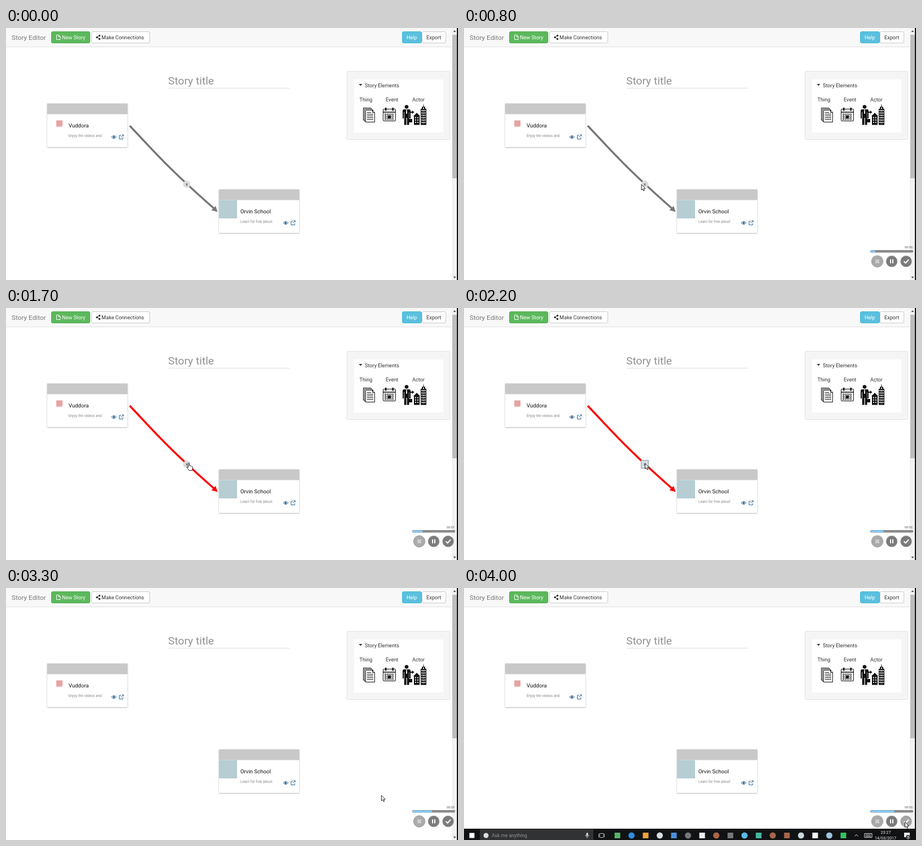
An HTML page that plays this animation: 800x446 px, repeating every 4100 ms.

```html
<!DOCTYPE html>
<html lang="en">
<head>
<meta charset="utf-8">
<title>Story Editor</title>
<style>
  html, body { margin: 0; width: 100%; height: 100%; overflow: hidden; background: #fff; }
  svg { display: block; width: 800px; height: 446px; font: 9.1px Roboto, sans-serif; fill: #333; }
  .line { fill: none; stroke: currentColor; }
  .mid { text-anchor: middle; }
</style>
</head>
<body>
<svg viewBox="0 0 800 446">
  <defs>
    <filter id="shadow" x="-10%" y="-10%" width="120%" height="130%">
      <feDropShadow dx="0" dy="1" stdDeviation="1" flood-opacity=".35"/>
    </filter>
    <g id="tools" color="#2f6a9c">
      <path class="line" d="M-4.3 0Q0-5 4.3 0Q0 5-4.3 0Z"/>
      <circle r="1.8" fill="#23598a"/>
      <path class="line" d="M13-3H9.5V3.5H16V.5M12.5 .5L17-4M14-4H17V-1"/>
    </g>
  </defs>

  <!-- Toolbar -->
  <path fill="#f8f8f8" d="M0 0H789V33H0Z"/>
  <path fill="#e2e2e2" d="M0 33H789V34H0Z"/>
  <text x="10" y="21" font-size="11.8" fill="#777">Story Editor</text>
  <rect x="80.5" y="6.5" width="68" height="20" rx="2.5" fill="#5cb85c" stroke="#4cae4c"/>
  <path class="line" color="#fff" d="M89.5 12.5H93.5L96 15V20.5H89.5ZM93 12.5V15.5H96"/>
  <text x="99" y="19.5" fill="#fff">New Story</text>
  <rect x="151.5" y="6.5" width="103" height="20" rx="2.5" fill="#fff" stroke="#ccc"/>
  <path class="line" color="#333" d="M165.5 13.5L161 16.5L165.5 19.5"/>
  <circle cx="161" cy="16.5" r="1.7"/>
  <circle cx="165.5" cy="13.5" r="1.7"/>
  <circle cx="165.5" cy="19.5" r="1.7"/>
  <text x="169" y="19.5">Make Connections</text>
  <rect x="701.5" y="6.5" width="34" height="20" rx="2.5" fill="#5bc0de" stroke="#46b8da"/>
  <text x="709" y="19.5" fill="#fff">Help</text>
  <rect x="736.5" y="6.5" width="42" height="20" rx="2.5" fill="#fff" stroke="#ccc"/>
  <text x="744" y="19.5">Export</text>

  <!-- Scrollbar -->
  <path fill="#f1f1f1" d="M789 0H798V446H789Z"/>
  <path fill="#bcbcbc" d="M790 12H798V266H790Z"/>
  <path fill="#555" d="M791.5 7L794 4L796.5 7ZM791.5 440L794 443L796.5 440Z"/>
  <path fill="#111" d="M798 0H800V446H798Z"/>

  <text x="287" y="99.5" font-size="19.2" fill="#929292">Story title</text>
  <path fill="#ddd" d="M287 106H502V107H287Z"/>

  <!-- Elements panel -->
  <rect x="603.5" y="76.5" width="182" height="121" rx="2" fill="#f5f5f5" stroke="#e3e3e3"/>
  <path fill="#fff" d="M616 91H774V185H616Z"/>
  <path d="M624.5 99H630.5L627.5 102.5Z"/>
  <text x="635" y="104.5">Story Elements</text>
  <text x="625.5" y="129.5">Thing</text>
  <text x="672" y="129.5">Event</text>
  <text x="719" y="129.5">Actor</text>
  <g color="#111" fill="#111">
    <!-- Page stack -->
    <path class="line" d="M634 163H632.5V141.5H645.5L648 144M636 165H634.5V143.5H647.5L650 146"/>
    <path class="line" d="M636.5 145.5H648.5L652.5 149.5V166.5H636.5ZM648.5 145.5V149.5H652.5"/>
    <path class="line" d="M639 149.5H646M639 152.5H650M639 155.5H650M639 158.5H650M639 161.5H650"/>
    <!-- Calendar -->
    <rect class="line" x="667.5" y="143.5" width="22" height="21" rx="1.5"/>
    <path class="line" d="M668 149H690" stroke-width="1.5"/>
    <path class="line" stroke-width="3" stroke-dasharray="3 1.2" d="M670 153H687M670 157H687M670 161H687"/>
    <path stroke="#fff" stroke-width="1.4" fill="none" stroke-dasharray="1.6 2.6" d="M670.7 153H687M670.7 157H687M670.7 161H687"/>
    <path d="M671 141H673.5V146.5H671ZM683.5 141H686V146.5H683.5ZM676 155H681V160H676Z"/>
    <!-- Person -->
    <circle cx="709" cy="139.5" r="3.3"/>
    <path d="M704.5 144H713.5Q716 144 716 147V160H714V149H713.5V171.5H709.7V159H708.5V171.5H704.8V149H704V160H702V147Q702 144 704.5 144ZM712 161H719V167H712Z"/>
    <path fill="#fff" d="M708.3 144.5H709.7L710 151L709 152.5L708 151Z"/>
    <path d="M716 148H719V146L722.5 149L719 152V150H716Z"/>
    <!-- House and tower -->
    <path d="M721 156L727 150L733 156H732V171.5H722V156ZM734 143H736V139.5H738.5V135.5H739.5V139.5H742V143H744V171.5H734Z"/>
    <path class="line" color="#fff" stroke-width="1.8" stroke-dasharray="2.2 2" d="M725 157.5V168M729 157.5V168M736.3 145V169M739 141V169M741.7 145V169"/>
  </g>

  <g id="cards"></g>

  <!-- Connection -->
  <g id="link">
    <path class="line" stroke-width="3.4" d="M219 173C264 220.500 289 250 370 321"/>
    <path fill="currentColor" d="M374.5 325.5L363.500 322.500L371 315Z"/>
    <circle id="badge" cx="320" cy="276.5" r="6.5" fill="#dcdcdc"/>
    <rect id="focus" x="313.5" y="269.5" width="13" height="14" fill="#d3dbe0" stroke="#8da0ac"/>
    <text x="320" y="279.2" class="mid" font-size="8">x</text>
  </g>

  <!-- Recorder -->
  <g id="recorder">
    <text id="clock" x="794" y="390" font-size="5.6" text-anchor="end" fill="#555"></text>
    <rect x="719" y="393" width="76" height="4.5" rx="2" fill="#8b8b8b"/>
    <rect id="progress" x="719.5" y="393.5" height="3.5" rx="1.5" fill="#82c9f4"/>
    <g stroke="#999" stroke-width=".8">
      <circle cx="731.5" cy="413" r="10.3" fill="#aaa"/>
      <circle cx="757" cy="413" r="9.8" fill="#7b7b7b"/>
      <circle id="done" cx="782.5" cy="413" r="9.8"/>
    </g>
    <path class="line" color="#d4d4d4" stroke-width="2.5" d="M728.5 410L734.5 416M734.5 410L728.5 416"/>
    <path class="line" color="#fff" stroke-width="2" d="M755 409.5V416.5M759 409.5V416.5M778.5 413L781.5 416L787 410"/>
  </g>

  <!-- Taskbar -->
  <g id="taskbar">
    <path fill="#101214" d="M0 426H800V446H0Z"/>
    <path fill="#303234" d="M28 427H229V446H28Z"/>
    <path fill="#fff" d="M9.5 433.5H18.5V442.5H9.5Z"/>
    <circle cx="39" cy="438" r="4.5" fill="#ddd"/>
    <text x="49" y="441" font-size="8.5" fill="#939393">Ask me anything</text>
    <rect x="216.5" y="433" width="3" height="6" rx="1.5" fill="#ddd"/>
    <path class="line" color="#ddd" stroke-width=".8" d="M215 437Q215 440.5 218 440.5T221 437M218 440.5V443M240 434.5H247V441.5H240ZM238.5 435V441M248.5 435V441"/>
    <g id="apps"></g>
    <path class="line" color="#ddd" d="M691.5 439.5L694.5 436.5L697.5 439.5M709 434.5H722V441.5H709ZM711 437H720M711 439.5H720"/>
    <g class="mid" fill="#eee" font-size="7.2">
      <text x="746.5" y="435">23:27</text>
      <text x="746" y="445">14/03/2017</text>
    </g>
    <path fill="#eee" d="M779 433H789V441H784L782 443V441H779Z"/>
    <circle cx="786" cy="441" r="4" fill="#444"/>
    <text x="786" y="443.5" class="mid" font-size="6.5" fill="#fff">5</text>
  </g>

  <!-- Pointer -->
  <g id="pointer" fill="#fff" stroke="#111" stroke-width=".9" stroke-linejoin="round">
    <path id="arrow" d="M0 0V9.8L2.2 7.8L3.7 11.3L5.4 10.5L3.9 7.2H6.8Z"/>
    <path id="hand" d="M2-.5Q3.2-1.5 4 0V4L6 4.3L8 5L9.6 6V9.5L8.5 12.5H3.2L1 9L-.8 6.8Q-.5 5.5 1 6.3L2 7.3Z"/>
  </g>
</svg>
<script>
  const el = Object.fromEntries([...document.querySelectorAll("[id]")].map(n => [n.id, n]));

  const card = (x, y, name, about, mark) => `<g transform="translate(${x} ${y})">
    <path filter="url(#shadow)" fill="#fff" d="M0 0H142V77H0Z"/>
    <path fill="#c8c8c8" d="M0 0H142V19H0Z"/>${mark}
    <text x="37.7" y="42.3" font-size="9.6" fill="#111">${name}</text>
    <text x="37.7" y="59.5" font-size="6.45" fill="#8c8c8c">${about}</text>
    <use href="#tools" x="118" y="59.5"/></g>`;
  el.cards.innerHTML =
    card(73, 133.5, "Vuddora", "Enjoy the videos and", '<path fill="#e9a3a3" d="M16 30H27V41H16Z"/>') +
    card(377, 285.5, "Orvin School", "Learn for free about", '<path fill="#b5cdd3" d="M0 19H32V51.5H0Z"/>');

  const appColors = ["#58b368", "#2d8fe0", "#e8a33d", "#d9dbe0", "#4b8fd8", "#777", "#eee", "#a8654a",
    "#777", "#59b9e8", "#45b8a0", "#a8654a", "#a8654a", "#c9d6dc", "#f4f4f4", "#9fc3dc", "#35c45e"];
  el.apps.innerHTML = appColors.map((color, i) => i % 2
    ? `<circle cx="${271.5 + 25 * i}" cy="438" r="5.5" fill="${color}"/>`
    : `<rect x="${266.5 + 25 * i}" y="433" width="10" height="10" fill="${color}"/>`).join("");

  // Pointer stops: time, x, y
  const stops = [[0, 783, 425], [600, 318, 283], [800, 314, 277], [1000, 314, 277], [1200, 320.5, 275],
    [2400, 320.5, 275], [2900, 485.5, 294], [3600, 780.5, 414], [4100, 780.5, 414]];

  const pointerAt = t => {
    const i = stops.findIndex(s => s[0] > t);
    const [t0, x0, y0] = stops[i - 1], [t1, x1, y1] = stops[i];
    const k = (t - t0) / (t1 - t0), ease = k * k * (3 - 2 * k);
    return [x0 + (x1 - x0) * ease, y0 + (y1 - y0) * ease];
  };
  const show = (node, on) => node.style.display = on ? "" : "none";
  const start = performance.now();

  function draw(now) {
    const t = Math.floor(Math.max(0, now - start) % 4100 / 100) * 100;
    const hovered = t >= 1200, pressed = t >= 2000, finished = t > 3800;
    show(el.recorder, t >= 100);
    show(el.pointer, t >= 100);
    show(el.link, t < 2400);
    show(el.badge, !pressed);
    show(el.focus, pressed);
    show(el.hand, hovered && !pressed);
    show(el.arrow, !hovered || pressed);
    show(el.taskbar, finished);
    el.done.setAttribute("fill", finished ? "#a5a5a5" : "#7b7b7b");
    el.link.setAttribute("color", hovered ? "#f00" : "#777");
    el.progress.setAttribute("width", t * 0.0105);
    el.clock.textContent = "00:0" + Math.floor(Math.max(0, t - 100) / 1000);
    el.pointer.setAttribute("transform", `translate(${pointerAt(t)})`);
    el.taskbar.setAttribute("transform", `translate(0 ${Math.max(0, 4000 - t) / 10})`);
    requestAnimationFrame(draw);
  }
  draw(start);
</script>
</body>
</html>
```
